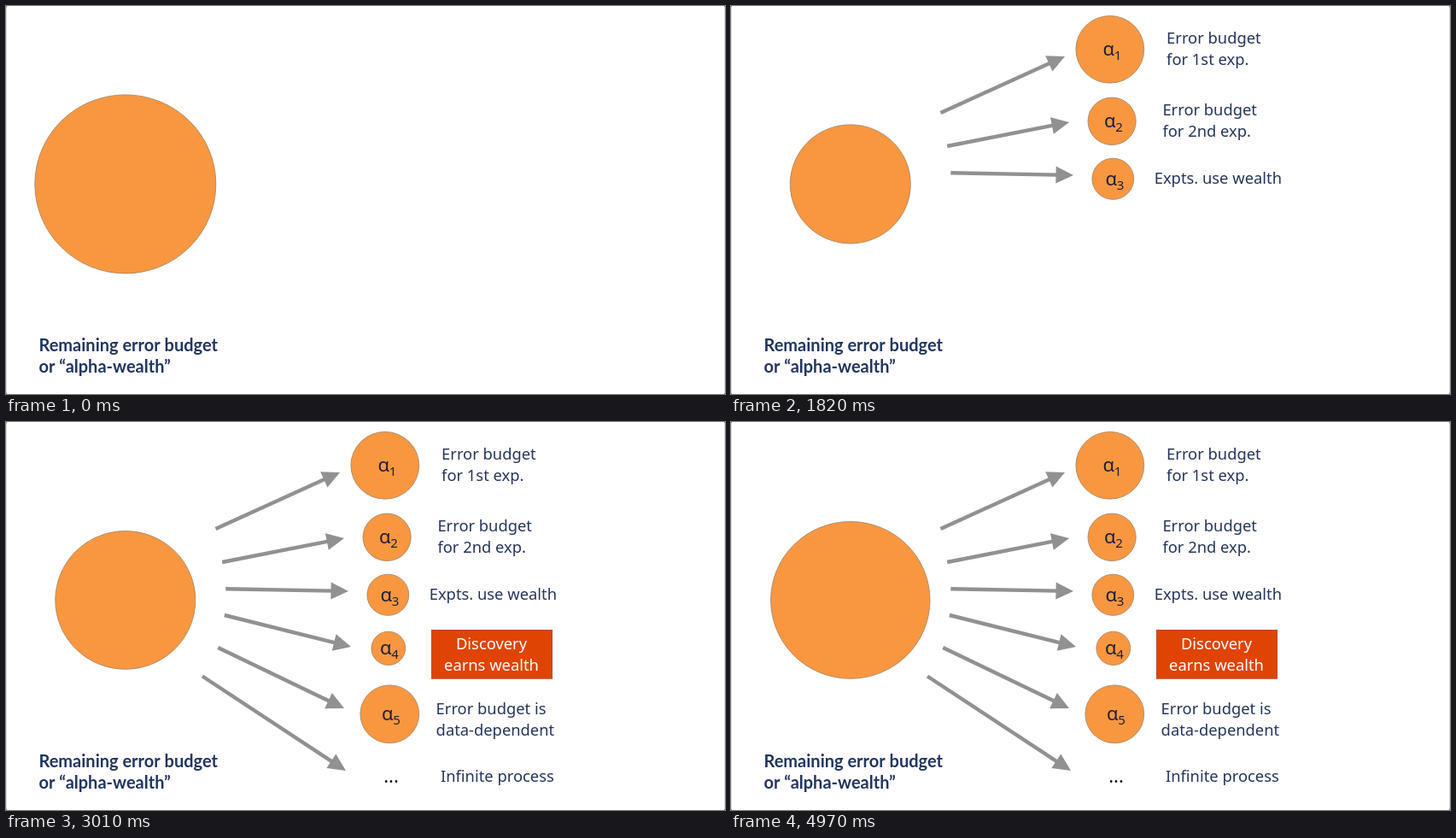
Recreate the animation shown at these times as an HTML page with a canvas. Size 842 px wide and 454 px high, loop 5110 ms.

```html
<!DOCTYPE html>
<html lang="en">
<head>
<meta charset="utf-8">
<title>Error budget</title>
<style>
  html, body { margin: 0; width: 100%; height: 100%; overflow: hidden; background: #fff; }
  canvas { display: block; width: 842px; height: 454px; }
</style>
</head>
<body>
<canvas id="stage" width="842" height="454"></canvas>
<script>
const ctx = document.getElementById('stage').getContext('2d');
const LOOP = 5110, STEP = 70, FADE = 140;
const ORANGE = '#f99740', OUTLINE = '#a98768', GREY = '#919191', NAVY = '#24365c';
const SANS = '"Noto Sans", sans-serif';
const LABEL_FONT = '18.35px ' + SANS;

// Wealth radius changes: [start, end, new radius]
const START_RADIUS = 106;
const changes = [
  [840, 1050, 92], [1190, 1400, 80.5], [1540, 1750, 70.5],
  [1820, 2000, 61], [2080, 2310, 117], [2310, 2450, 101.8],
  [2590, 2800, 88], [2940, 3080, 76], [3180, 3360, 67],
  [3430, 3570, 57.3], [3710, 4130, 93.2]
];

// Each experiment: arrow ends, bubble, symbol origin, label origin
const experiments = [
  { at: 840, arrow: [245.5, 125, 391, 59], bubble: [443.8, 50.8, 39.9], symbol: [435.5, 57.6],
    label: [510.1, 43.5], lines: ['Error budget', 'for 1st exp.'] },
  { at: 1190, arrow: [253.2, 164, 396, 136], bubble: [446.1, 134.8, 28.1], symbol: [437, 141.6],
    label: [505.4, 127.6], lines: ['Error budget', 'for 2nd exp.'] },
  { at: 1540, arrow: [257.3, 195.3, 401, 198], bubble: [447.3, 202.3, 24.4], symbol: [438.5, 209.6],
    label: [495.7, 207.8], lines: ['Expts. use wealth'] },
  { at: 1820, arrow: [255.8, 226, 404, 263], bubble: [447.8, 264.8, 19.9], symbol: [438, 271.8] },
  { at: 2290, arrow: [248.3, 264, 396, 335], bubble: [449.3, 341.8, 34.4], symbol: [440, 348.8],
    label: [503.6, 341.8], lines: ['Error budget is', 'data-dependent'] },
  { at: 2590, arrow: [230, 297.5, 398, 408],
    label: [509, 421], lines: ['Infinite process'] }
];
const DISCOVERY_AT = 2080;

const clamp = v => Math.max(0, Math.min(1, v));
const ease = v => v * v * (3 - 2 * v);

function wealthRadius(t) {
  return changes.reduce((r, [start, end, next]) =>
    r + (next - r) * ease(clamp((t - start) / (end - start))), START_RADIUS);
}

function text(str, x, y, font, color, align = 'left') {
  ctx.font = font;
  ctx.fillStyle = color;
  ctx.textAlign = align;
  ctx.fillText(str, x, y);
}

function disc(x, y, r) {
  ctx.beginPath();
  ctx.ellipse(x, y, r, r * 0.986, 0, 0, Math.PI * 2);
  ctx.fillStyle = ORANGE;
  ctx.fill();
  ctx.strokeStyle = OUTLINE;
  ctx.lineWidth = 0.9;
  ctx.stroke();
}

function arrow(x1, y1, x2, y2) {
  const length = Math.hypot(x2 - x1, y2 - y1);
  ctx.save();
  ctx.translate(x1, y1);
  ctx.rotate(Math.atan2(y2 - y1, x2 - x1));
  ctx.fillStyle = GREY;
  ctx.fillRect(0, -2.2, length - 19, 4.4);
  ctx.beginPath();
  ctx.moveTo(length, 0);
  ctx.lineTo(length - 20.5, -10);
  ctx.lineTo(length - 20.5, 10);
  ctx.fill();
  ctx.restore();
}

function drawExperiment(exp, index) {
  arrow(...exp.arrow);
  if (exp.bubble) {
    const [x, y] = exp.symbol;
    disc(...exp.bubble);
    text('α', x, y, '22px ' + SANS, '#211d38');
    text(String(index + 1), x + 13.2, y + 5, '15px ' + SANS, '#211d38');
  } else {
    text('...', 451, 422, '22px ' + SANS, '#151515', 'center');
  }
  (exp.lines || []).forEach((line, i) =>
    text(line, exp.label[0], exp.label[1] + i * 25.5, LABEL_FONT, NAVY));
}

function drawDiscovery() {
  ctx.fillStyle = '#e04403';
  ctx.fillRect(498, 243, 142, 57.5);
  ctx.strokeStyle = '#bd4a22';
  ctx.lineWidth = 1;
  ctx.strokeRect(498.5, 243.5, 141, 56.5);
  text('Discovery', 568.5, 265.8, LABEL_FONT, '#fff', 'center');
  text('earns wealth', 568.5, 291.2, LABEL_FONT, '#fff', 'center');
}

function drawBorder() {
  ctx.fillStyle = '#dadada';
  ctx.fillRect(0, 0, 1, 454);
  ctx.fillRect(841, 0, 1, 454);
  ctx.fillStyle = '#777';
  for (const x of [0, 841]) for (const y of [0, 453]) ctx.fillRect(x, y, 1, 1);
}

function fadeIn(t, start, draw) {
  ctx.globalAlpha = clamp((t - start) / FADE);
  if (ctx.globalAlpha > 0) draw();
  ctx.globalAlpha = 1;
}

function render(now) {
  const t = Math.floor((now % LOOP) / STEP) * STEP;
  ctx.fillStyle = '#fff';
  ctx.fillRect(0, 0, 842, 454);
  drawBorder();
  disc(139.8, 208.4, wealthRadius(t));
  const bold = 'bold 20px Lato, sans-serif';
  text('Remaining error budget', 38.5, 404, bold, '#213661');
  text('or “alpha-wealth”', 38.5, 429, bold, '#213661');
  experiments.forEach((exp, i) => fadeIn(t, exp.at, () => drawExperiment(exp, i)));
  fadeIn(t, DISCOVERY_AT, drawDiscovery);
}

const origin = performance.now();
function tick() {
  render(performance.now() - origin);
  requestAnimationFrame(tick);
}
tick();
</script>
</body>
</html>
```
